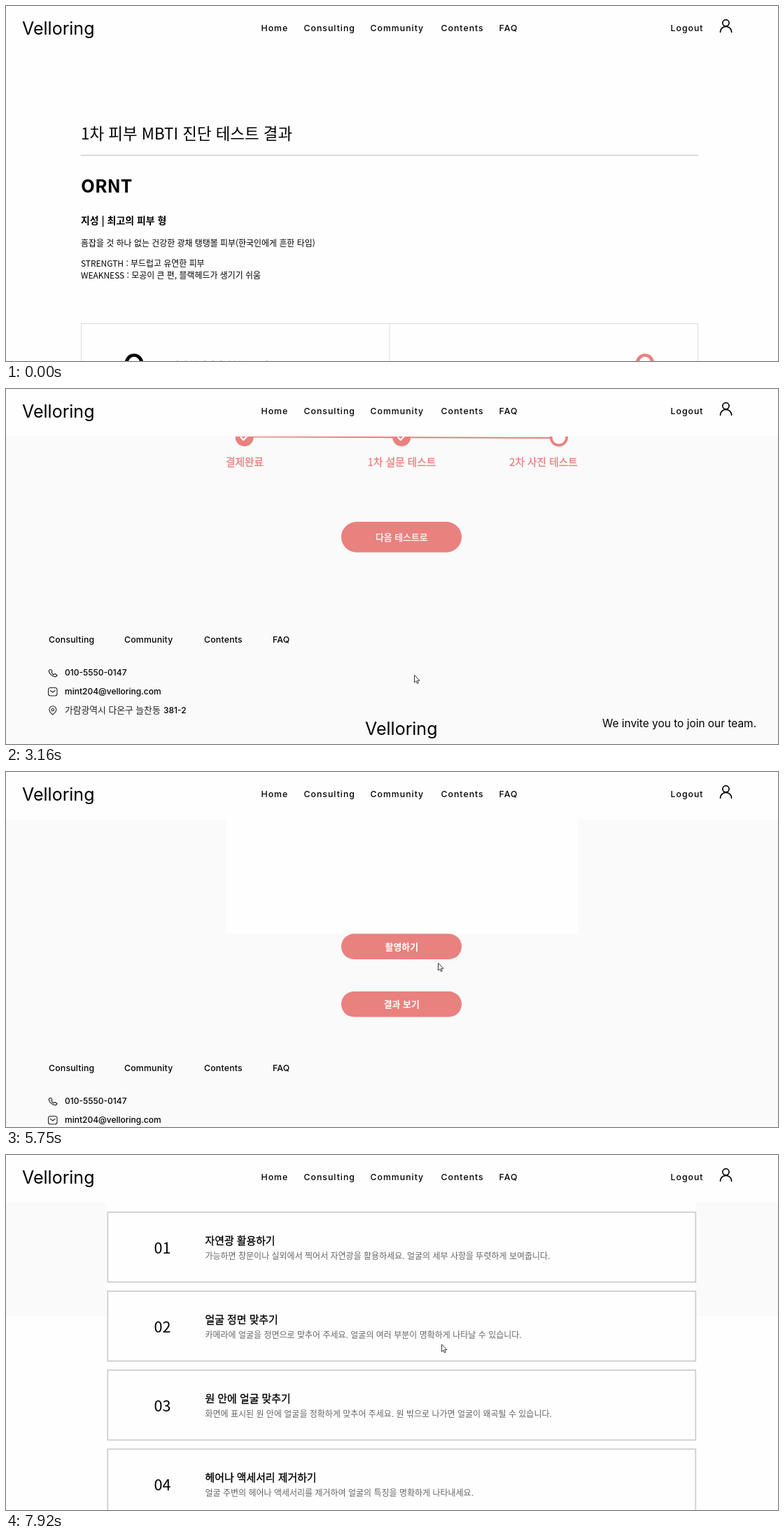
Recreate the animation shown at these times as an HTML page. Size 1103 by 508 pixels, loop 8000 ms.

```html
<!DOCTYPE html>
<html lang="ko">
<head>
<meta charset="utf-8">
<title>Skin test</title>
<style>
  html, body { margin: 0; width: 100%; height: 100%; overflow: hidden; background: #fefefe; }
  svg { display: block; width: 1103px; height: 508px; }
  text { white-space: pre; }
  .k { font-family: "Noto Sans CJK KR", "Noto Sans CJK JP", "Noto Sans CJK", sans-serif; }
  .n { font-family: Inter, "Open Sans", sans-serif; }
</style>
</head>
<body>
<svg id="stage" viewBox="0 0 1103 508"></svg>
<script>
const LOOP = 8000, STEP = 98;
const PINK = '#e9817f', HOVER = '#ec9592', GREY = '#666', PALE = '#999';
const BRAND = 'Velloring';

// Text is placed by the middle of its line.
function type(cls, x, mid, size, str, { fill = '#000', w = 400, at = 'start', ls = 0, edge = '' } = {}) {
  return `<text class="${cls}" x="${x}" y="${mid + size * .37}" font-size="${size}" fill="${fill}"` +
    ` font-weight="${w}" text-anchor="${at}" letter-spacing="${ls}" ${edge}>${str}</text>`;
}
// The Korean font has no medium cut, so a thin outline stands in for it.
function ko(x, mid, size, str, o = {}) {
  const medium = o.w === 500 && { w: 400, edge: `stroke="${o.fill || '#000'}" stroke-width="${size * .022}"` };
  return type('k', x, mid, size, str, { ...o, ...medium });
}
const en = (...a) => type('n', ...a);
const mid = (fill, w) => ({ fill, w, at: 'middle' });
const each = (list, fn) => list.map(fn).join('');
const rect = (x, y, w, h, attrs) => `<rect x="${x}" y="${y}" width="${w}" height="${h}" ${attrs}/>`;
const disc = (x, y, r, attrs) => `<circle cx="${x}" cy="${y}" r="${r}" ${attrs}/>`;
const hollow = (color, w) => `fill="none" stroke="${color}" stroke-width="${w}" stroke-linecap="round" stroke-linejoin="round"`;
const line = (d, color, w) => `<path d="${d}" ${hollow(color, w)}/>`;
const group = (id, body, dy = 0) => `<g id="${id}" transform="translate(0 ${dy})">${body}</g>`;

const button = (y, h, label, w, id = '') =>
  rect(479, y, 172, h, `rx="${h / 2}" fill="${PINK}" id="${id}"`) +
  ko(565.3, y + h / 2, 12.9, label, mid('#fff', w));

const logo = (x, y) => en(x, y, 25, BRAND);

function header() {
  const nav = [[364.5, 'Home'], [425.5, 'Consulting'], [520.5, 'Community'], [621.5, 'Contents'], [704.5, 'FAQ'], [949.5, 'Logout']];
  return rect(0, 0, 1103, 68, 'fill="#fefefe"') + logo(23, 32) +
    each(nav, ([x, s]) => en(x, 31, 12.3, s, { w: 500, ls: 1 })) +
    disc(1028.5, 24.3, 4.6, hollow('#000', 1.7)) +
    line('M1020.6 37.3a8 8 0 0 1 16 0', '#000', 1.7);
}

function footer(dy) {
  const nav = [[61, 'Consulting'], [169, 'Community'], [283, 'Contents'], [381, 'FAQ']];
  const icons =
    line('M63 401.5q-2.5 1-1.5 3.5 2.5 5 7.5 6.5 3 .8 4-2l-3-2-2 1.2q-2-1-3-3.2l1-1.5-1.5-2.5z', '#222', 1.1) +
    rect(60.5, 427.5, 12.5, 11.5, 'rx="3" ' + hollow('#222', 1.1)) +
    line('M63.5 431.5l3.3 2.5 3.3-2.5', '#222', 1.1) +
    line('M66.8 466q-5-4-5-7.2a5 5 0 0 1 10 0q0 3.2-5 7.2z', '#222', 1.1) +
    disc(66.8, 459, 1.7, hollow('#222', 1.1));
  return group('', each(nav, ([x, s]) => en(x, 358, 12.3, s, { w: 500, ls: .2 })) + icons +
    en(84, 406, 12, '010-5550-0147', { w: 500 }) +
    en(84, 433, 12, 'mint204@velloring.com', { w: 500 }) +
    ko(84, 459.5, 12.8, '가람광역시 다온구 늘찬동', { fill: '#222' }) + en(225, 459.5, 12, '381-2', { w: 500 }) +
    logo(513, 486) + en(852, 478.5, 15.45, 'We invite you to join our team.'), dy);
}

const DESC = 12.8;
const lineWidth = str => DESC * [...str].reduce((sum, c) => sum + (c === ' ' ? .224 : .925), 0);

// Half a result card: a centred badge of width w, and a paragraph beside it.
function half(right, top, h, w, [letter, name, eng, ...desc]) {
  const words = eng.split(' ');
  const y = top + (h - 153) / 2 - 8 * (words.length - 1);
  const cx = right ? 928.5 - w / 2 : 167.5 + w / 2;
  const dx = right ? 870 - w - lineWidth(desc[0]) : 204.5 + w;
  const color = right ? PINK : '#000';
  const split = words.length > 1;
  return ko(cx, y + 61, 43, letter, mid(color, 500)) +
    ko(cx, y + 96.5, 14.8, name, mid(color, 500)) +
    each(words, (s, i) => ko(split ? cx - w / 2 : cx, y + 115.5 + i * 16, 11.5, s, { fill: PALE, at: split ? 'start' : 'middle' })) +
    each(desc, (s, i) => ko(dx, top + h / 2 + .5 + (i - (desc.length - 1) / 2) * 18.5, DESC, s, { fill: GREY }));
}

function resultPage() {
  const rows = [
    { h: 153, w: [31, 31],
      left: ['O', '건성', 'Dry', '피지 분비량과 수분 보유량 모', '두 적어 거칠고 각질과 주름이', '잘 생기는 타입'],
      right: ['O', '지성', 'Oily', '피지 분비량이 많아 번들거리고 여드름이 자주 생', '기는 타입'] },
    { h: 153, w: [47, 47],
      left: ['R', '민감성', 'Sensitive', '피부가 얇고 섬세해 외부', '자극에 쉽게 반응하는 타', '입'],
      right: ['R', '저항성', 'Resistant', '피부 장벽이 견고해 외부적인 스트레스에 대해 견', '디는 힘이 강한 타입'] },
    { h: 169, w: [44, 64],
      left: ['N', '민감성', 'Pigment', '멜라닌 활성도가 높아 기', '미, 주근깨 혹은 잡티 등', '눈에 보이는 색소가 많은', '타입'],
      right: ['N', '비색소성', 'Non- Pigment', '멜라닌 활성도가 낮아 눈에 보이는 색소가 적', '은 타입'] },
    { h: 153, w: [45, 41],
      left: ['T', '주름성', 'Wrinkled', '피부 탄력이 낮아 주름이', '쉽게 생기는 타입'],
      right: ['T', '탄력성', 'Tight', '피부 탄력이 높아 주름이 잘 생기지 않는 탄탄한', '타입'] }
  ];
  let top = 454.5;
  const cards = each(rows, ({ h, w, left, right }) => {
    const y = top;
    top += h + 15.5;
    return rect(107.5, y, 881, h, 'fill="none" stroke="#ddd"') + line(`M548 ${y}v${h}`, '#ddd', 1) +
      half(false, y, h, w[0], left) + half(true, y, h, w[1], right);
  });
  return ko(107, 183, 22.4, '1차 피부 MBTI 진단 테스트 결과') +
    line('M107 213.5H989', '#bbb', 1) +
    ko(107, 257, 25.9, 'ORNT', { w: 700 }) +
    ko(107, 307, 13.95, '지성 | 최고의 피부 형', { w: 700 }) +
    ko(107, 339.5, 11.95, '흠잡을 것 하나 없는 건강한 광채 탱탱볼 피부(한국인에게 흔한 타입)') +
    ko(107, 369, 11.95, 'STRENGTH : 부드럽고 유연한 피부') +
    ko(107, 386, 11.95, 'WEAKNESS : 모공이 큰 편, 블랙헤드가 생기기 쉬움') +
    cards + button(1226, 43.5, '다음 테스트로', 500, 'next') + footer(1036);
}

function stepsPage() {
  const tick = x => disc(x, 69, 13, `fill="${PINK}"`) + line(`M${x - 5} 69.3l3.6 3.6 6.6-6.8`, '#fff', 2.2);
  const names = [[341, '결제완료'], [565.5, '1차 설문 테스트'], [768, '2차 사진 테스트']];
  return ko(565.5, -70.5, 18.8, '1차 설문 테스트 완료', mid('#000', 700)) +
    ko(565.3, -13, 14.9, '2차 사진 테스트 진단을 완료하여 주세요.', mid('#777')) +
    ko(565.3, 8.5, 14.9, '정확한 진단을 위해 유의사항을 잘 참고해주세요.', mid('#777')) +
    line('M341 68.3L790 70', PINK, 2) + tick(340.7) + tick(565.2) +
    disc(789.9, 69.3, 11.2, `fill="#fff" stroke="${PINK}" stroke-width="3.8"`) +
    each(names, ([x, s]) => ko(x, 104.8, 14.7, s, mid(PINK, 500))) +
    button(190, 43.7, '다음 테스트로', 500, 'go') + footer(0);
}

function photoPage() {
  const tips = [
    ['자연광 활용하기', '가능하면 창문이나 실외에서 찍어서 자연광을 활용하세요. 얼굴의 세부 사항을 뚜렷하게 보여줍니다.'],
    ['얼굴 정면 맞추기', '카메라에 얼굴을 정면으로 맞추어 주세요. 얼굴의 여러 부분이 명확하게 나타날 수 있습니다.'],
    ['원 안에 얼굴 맞추기', '화면에 표시된 원 안에 얼굴을 정확하게 맞추어 주세요. 원 밖으로 나가면 얼굴이 왜곡될 수 있습니다.'],
    ['헤어나 액세서리 제거하기', '얼굴 주변의 헤어나 액세서리를 제거하여 얼굴의 특징을 명확하게 나타내세요.']
  ];
  const card = ([head, body], i) => {
    const y = 380.3 + 113 * i;
    return rect(145.3, y, 840, 100, 'fill="#fefefe" stroke="#ccc" stroke-width="1.7"') +
      ko(211.5, y + 51.7, 21.6, '0' + (i + 1)) +
      ko(284.5, y + 40.2, 14.9, head, { w: 500 }) +
      ko(284.5, y + 63.2, 12, body, { fill: GREY });
  };
  return ko(565.2, 134.5, 12, '2차 사진 촬영 테스트', mid(PINK)) +
    ko(565.2, 182.5, 36.1, '2차 사진 촬영 AI 테스트', mid('#000')) +
    disc(565.3, 270.8, 15, `fill="${PINK}"`) + en(565.3, 270.8, 19, 'i', mid('#fff', 700)) +
    ko(565.2, 319, 22.5, '촬영 전 안내사항', mid('#000')) +
    each(tips, card) +
    button(1053.5, 36.5, '촬영하기', 700) + button(1136, 36.5, '결과 보기', 700) + footer(887);
}

const stage = document.getElementById('stage');
stage.innerHTML =
  rect(0, 0, 1103, 508, 'id="back"') +
  group('bands', rect(0, 68, 1103, 163, 'fill="#fafafa"') + rect(0, 68, 0, 163, 'id="gap" fill="#fefefe"')) +
  group('p0', resultPage()) + group('p1', stepsPage()) + group('p2', photoPage()) + header() +
  '<path id="cursor" d="M0 0V10.4L2.4 8.3 4 12 5.7 11.3 4.1 7.7H7.5Z" fill="#fff" stroke="#222" stroke-width=".9"/>';

const $ = id => document.getElementById(id);
const smooth = p => p * p * (3 - 2 * p);

// Eased progress of a gesture, held for about STEP ms at a time.
function progress(t, from, to) {
  if (t < from) return 0;
  const n = Math.round((to - from) / STEP);
  const k = Math.floor((t - from) / (to - from) * n + 1e-6);
  return smooth(Math.min(1, (k + 1) / (n + 1)));
}
// Runs through gestures { from, to, end } and gives the value at t.
const follow = (t, start, moves) => moves.reduce(
  (v, { from, to, end }) => v + (end - v) * progress(t, from, to), start);

const move = (from, to, end) => ({ from, to, end });
const PAGES = [
  { opens: 0, shift: 0, scrolls: [move(1090, 1380, -448), move(1970, 2360, -821)] },
  { opens: 3160, shift: 0, scrolls: [move(3260, 3760, 210), move(4460, 5050, 64)] },
  { opens: 5350, shift: -822, scrolls: [move(5840, 6240, -597), move(6440, 6640, 0), move(7430, 7730, -298.5)] }
];
const glide = (from, to, x, y) => ({ from, to, x, y });
const GLIDES = [
  glide(300, 500, 753.5, 202), glide(2560, 2960, 583.5, 409.5), glide(4260, 4460, 619.5, 247.5),
  glide(5150, 5250, 617.5, 273.5), glide(7030, 7130, 622.5, 271)
];
const pointer = (t, axis, start) => follow(t, start, GLIDES.map(g => move(g.from, g.to, g[axis])));

function draw(t) {
  const page = PAGES.findLastIndex(p => t >= p.opens);
  const dy = follow(t, PAGES[page].shift, PAGES[page].scrolls);
  PAGES.forEach((_, i) => $('p' + i).style.display = i === page ? '' : 'none');
  $('p' + page).setAttribute('transform', `translate(0 ${dy})`);
  $('cursor').setAttribute('transform', `translate(${pointer(t, 'x', 970)} ${pointer(t, 'y', -55)})`);

  // Near the foot of a page the backdrop is a touch greyer.
  const foot = (page === 1 && dy < 100) || (page === 2 && t < 5840);
  $('back').setAttribute('fill', foot ? '#fafafa' : page === 1 ? '#fdfdfd' : '#fefefe');
  $('bands').style.display = page === 2 ? '' : 'none';
  $('gap').setAttribute('x', foot ? 314 : 144);
  $('gap').setAttribute('width', foot ? 503 : 842);

  $('next').setAttribute('fill', t >= 2860 ? HOVER : PINK);
  $('go').setAttribute('fill', t >= 5250 ? HOVER : PINK);
}

const start = performance.now();
function tick() {
  draw((performance.now() - start) % LOOP);
  requestAnimationFrame(tick);
}
tick();
</script>
</body>
</html>
```
